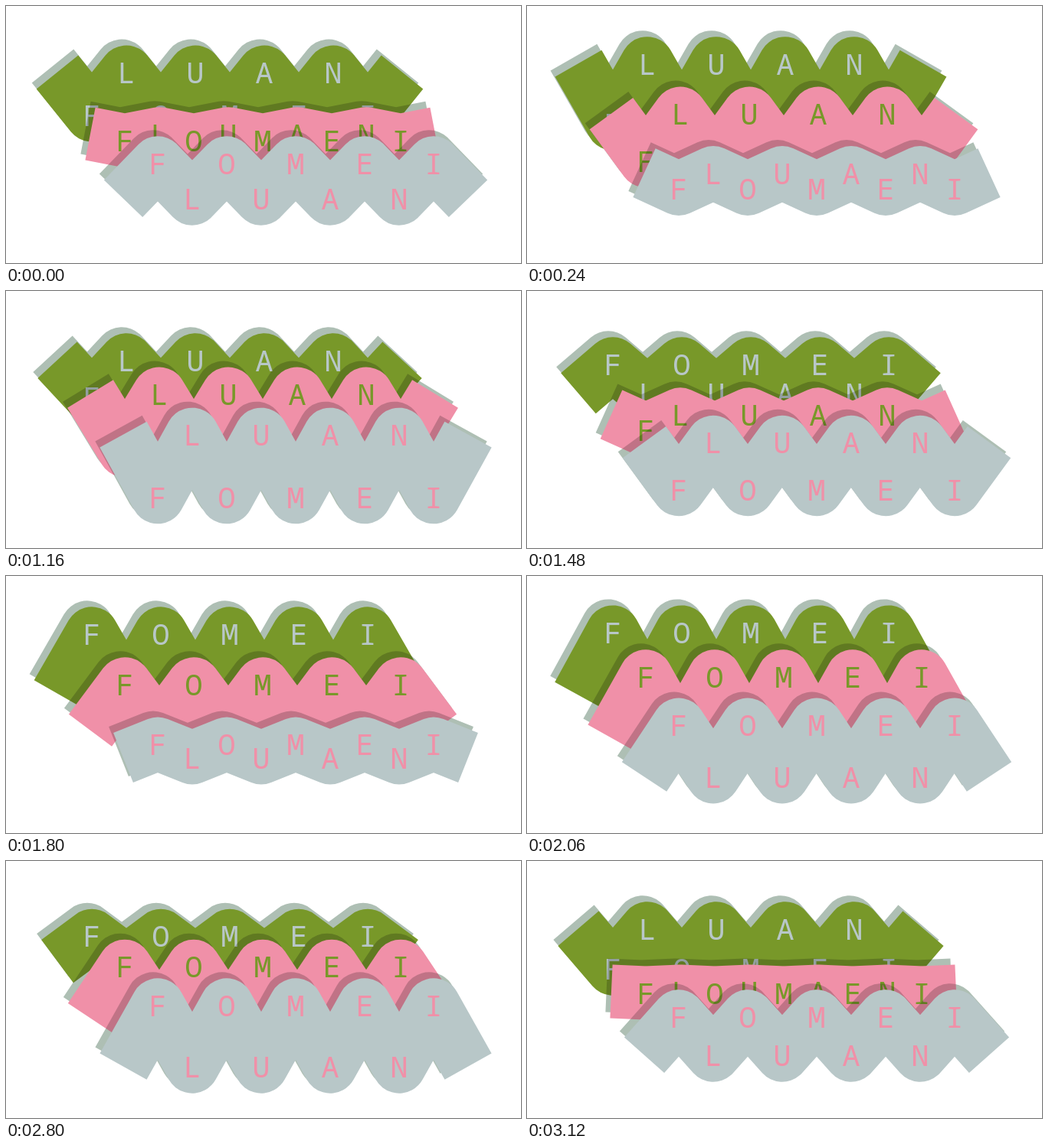
Animation of 672 by 336 pixels, one loop 3140 ms. Source, as an HTML page with a canvas:

```html
<!DOCTYPE html>
<html lang="en">
<head>
<meta charset="utf-8">
<title>Folding ribbons</title>
<style>
  html, body { margin: 0; width: 100%; height: 100%; overflow: hidden; background: #fff; }
  canvas { display: block; width: 672px; height: 336px; }
</style>
</head>
<body>
<canvas id="stage" width="672" height="336"></canvas>
<script>
const ctx = document.getElementById('stage').getContext('2d');

const LOOP = 3140, HALF = LOOP / 2, TICK = 20;
const EASE = 715; // time from flat to fully folded
const STEP = 45, FOLDS = 10, SWING = 41.1, THICK = 70;
const ODD = 'FOMEI', EVEN = 'LUAN';
const GREEN = '#789829', PINK = '#f090a8', GREY = '#b8c7c8', SHADE = '#aebfb4';

const rows = [
  { x: 67, y: 114.5, fill: GREEN, ink: GREY, cross: 2914 },
  { x: 110, y: 171.5, fill: PINK, ink: GREEN, cross: 3114 },
  { x: 153, y: 228.5, fill: GREY, ink: PINK, cross: 3314 }
];

// Cubic ease through the flat pose, with a short rest at each full fold.
function swing(t, cross) {
  const h = ((t - cross) % LOOP + LOOP) % LOOP;
  const m = h % HALF;
  const left = Math.max(0, 1 - Math.min(m, HALF - m) / EASE);
  return SWING * (1 - left ** 3) * (h < HALF ? 1 : -1);
}

function ribbon(row, amp, dx, dy, color, mode) {
  ctx.globalCompositeOperation = mode;
  ctx.strokeStyle = color;
  ctx.beginPath();
  for (let k = 0; k <= FOLDS; k++) {
    ctx.lineTo(row.x + k * STEP + dx, row.y + (k % 2 ? amp : -amp) + dy);
  }
  ctx.stroke();
}

function letters(row, amp) {
  ctx.fillStyle = row.ink;
  for (let k = 1; k < FOLDS; k++) {
    const odd = k % 2;
    const char = odd ? ODD[(k - 1) / 2] : EVEN[k / 2 - 1];
    ctx.fillText(char, row.x + k * STEP, row.y + (odd ? amp : -amp) + 14.5);
  }
}

function draw(t) {
  ctx.clearRect(0, 0, 672, 336);
  ctx.lineWidth = THICK;
  ctx.lineJoin = 'round';
  ctx.lineCap = 'butt';
  ctx.font = '300 39px "Noto Sans Mono", "DejaVu Sans Mono", monospace';
  ctx.textAlign = 'center';
  for (const row of rows) {
    const amp = swing(t, row.cross);
    // The shadow darkens what is below it and tints the bare page.
    ribbon(row, amp, -6, -8, 'rgba(0,0,0,0.2)', 'source-atop');
    ribbon(row, amp, -6, -8, SHADE, 'destination-over');
    ribbon(row, amp, 0, 0, row.fill, 'source-over');
    letters(row, amp);
  }
}

function tick() {
  const step = Math.floor((performance.now() + 4) / TICK);
  draw(step * TICK % LOOP);
  requestAnimationFrame(tick);
}
tick();
</script>
</body>
</html>
```
